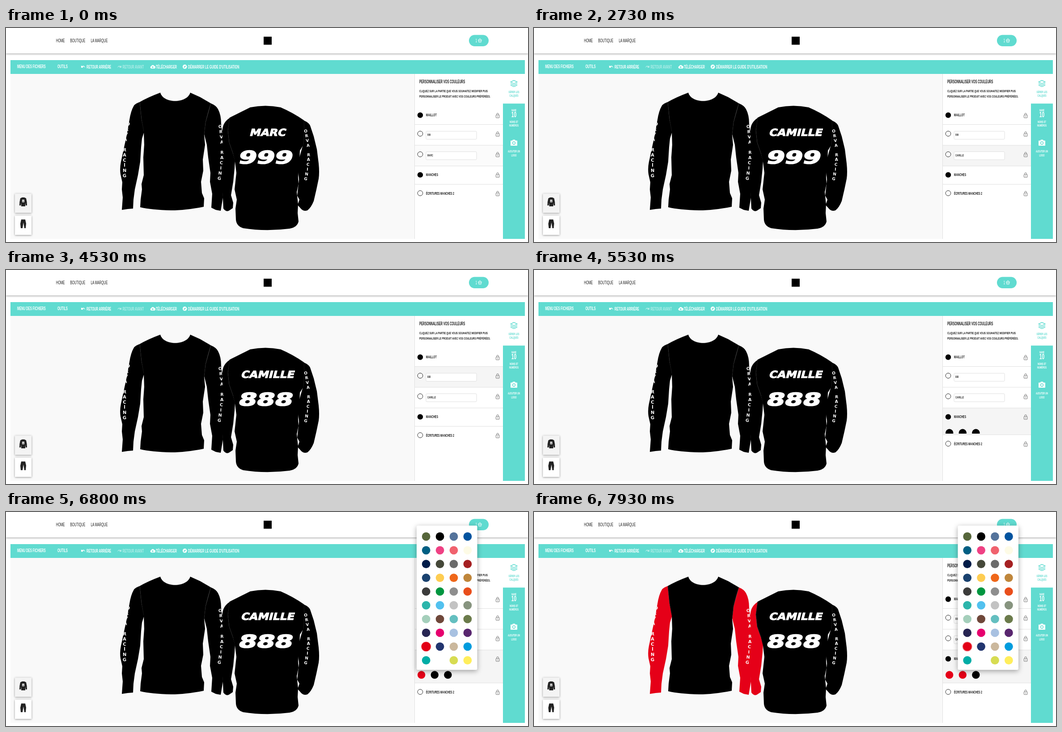
Write an HTML page that moves like this. It is 1167 by 480 pixels and loops after 8000 ms.

```html
<!DOCTYPE html>
<html lang="fr">
<head>
<meta charset="utf-8">
<title>Personnaliser vos couleurs</title>
<style>
  html, body { margin: 0; width: 100%; height: 100%; overflow: hidden; background: #fff; }
  svg { display: block; width: 100vw; height: 100vh; }
  text { font-family: "Liberation Sans", Arial, sans-serif; font-weight: 700; white-space: pre; }
  text.thin { font-weight: 400; }
  text.wide { font-family: "DejaVu Sans", sans-serif; fill: #fff; text-anchor: middle; }
  .mid { text-anchor: middle; }
  .line { stroke: #e0e0e0; }
  .shadow { filter: drop-shadow(0 1px 2px rgba(0, 0, 0, .4)); }
  .pop { filter: drop-shadow(0 3px 6px rgba(0, 0, 0, .35)); }
</style>
</head>
<body>
<svg id="stage" viewBox="0 0 1167 480" preserveAspectRatio="none" xmlns="http://www.w3.org/2000/svg"></svg>
<script>
const TEAL = '#60dbd0', RED = '#e50018', INK = '#1c1c1c';
const LOOP = 8000, NAME = 'CAMILLE', TEAM = 'ORVA RACING';
const COLORS = `56663b 000000 54739b 00539f 005f83 ef4184 f0626e fdfbe6
  001c48 454839 6b6b6b a52022 1a426f fecd52 ef671a bf863b
  3c3c3b 009640 8e8e8e e94e1b 2cb5ab 52c1ef c3c3c3 87947f
  a5cfbb 6f473a 64bfc0 6b7b4b 272552 e6006e a8c1e1 59266f
  e30016 22356f cbb89d 009cde 00ada6 ffffff d7dc52 ffee5c`.split(/\s+/).map(c => '#' + c);
const BLACK = 1, TURQUOISE = 36, SCARLET = 32;

// ---- drawing helpers ----
const label = (s, x, y, size, fill = INK, cls = '', id = '') =>
  `<text id="${id}" class="${cls}" transform="translate(${x} ${y}) scale(.6 1)" font-size="${size}" fill="${fill}">${s}</text>`;
const rect = (x, y, w, h, fill, more = '') =>
  `<rect x="${x}" y="${y}" width="${w}" height="${h}" fill="${fill}" ${more}/>`;
const dot = (x, y, r, fill, more = '') => `<circle cx="${x}" cy="${y}" r="${r}" fill="${fill}" ${more}/>`;
const path = (d, fill, more = '') => `<path d="${d}" fill="${fill}" ${more}/>`;
const hline = y => `<path class="line" d="M914 ${y}H1111"/>`;
const lock = y => `<g fill="none" stroke="#666" stroke-width=".9">
  <rect x="1095.4" y="${y - 1.5}" width="7.4" height="6.5" rx=".8"/>
  <path d="M1097 ${y - 1.5}v-1.8a2.1 2.1 0 0 1 4.2 0v1.8M1098 ${y + 1.8}h2.4"/></g>`;
const bullet = (y, full) => full ? dot(926, y, 6.2, '#000')
  : dot(926, y, 5.8, '#fff', 'stroke="#111" stroke-width=".9"');
const field = (y, id) => rect(939, y, 113, 18, '#fff', 'rx="2" stroke="#e0e0e0"')
  + rect(942, y + 2.5, 0, 13, '#b5d5fe', `id="${id}Sel"`)
  + label('', 942, y + 10.5, 7.2, '#333', '', id)
  + rect(942, y + 3.5, .9, 9.5, '#111', `id="${id}Caret"`);

// Letters stacked down a sleeve; place(i) gives [x, y, angle].
const stack = (clip, size, place) => `<g clip-path="url(#${clip})">` + [...TEAM].map((c, i) => {
  const [x, y, a] = place(i);
  return `<text class="wide" font-size="${size}" transform="translate(${x} ${y}) rotate(${a})" y="${size * .36}">${c}</text>`;
}).join('') + '</g>';

const SHAPES = {
  armL: 'M299 166Q290 169 286 174Q279 186 276 206L270 240 263 272 257 300Q254 315 256 328L260 346 259 362 261 380 259 408 272 406 284 405 285 385 288 362 295 330 300 300 302 268 304 248 309 232 303 205Z',
  armM: 'M458 169Q470 174 474 182Q481 195 481 215L484 245 485 275 488 300 489 325 484 352 485 380 480 410 469 408 459 403 461 372 456 345 457 325 452 290 449 262 443 238 446 212Z',
  armB: 'M501 201Q490 208 486 218Q481 234 482 260L484 300 487 330 483 352 485 385 486 405Q492 413 498 410L507 404 508 392 503 375 508 345 511 315 512 298 507 280 499 257 496 230Z',
  armR: 'M665 207Q677 212 680 219L688 243 695 272 699 304Q701 324 699 338L694 362 688 388Q682 403 674 409Q666 412 660 406L652 397 656 385 651 376 655 340 653 320 656 290 664 262Z',
  front: 'M345 145C352 170 404 170 412 145L434 155 458 169Q452 188 446 212L443 240 445 262 440 295 441 320 436 345 438 370 443 382 442 401Q400 409 370 409Q325 408 300 402L301 385 304 362 303 350 308 330 307 290 309 262 308 232 303 205 299 166Q318 155 345 145Z',
  back: 'M500 201Q522 190 546 178Q580 171 614 178Q642 190 666 207L667 235 665 262 657 275 656 300 653 335 654 350 650 368 653 395 652 415 654 434Q651 447 634 450Q580 457 530 449Q515 444 514 430L513 405 516 385 511 362 515 325 512 300 507 280 499 257 496 230Z'
};
const cloth = (k, id = '') => path(SHAPES[k], '#000', `id="${id}"`);

const header = rect(0, 0, 1167, 57, '#fff', 'class="shadow"')
  + label('HOME', 112, 31.8, 10.8, INK, 'thin') + label('BOUTIQUE', 143.5, 31.8, 10.8, INK, 'thin')
  + label('LA MARQUE', 189.5, 31.8, 10.8, INK, 'thin')
  + rect(576, 19.5, 18, 18, '#000')
  + rect(1035, 15.5, 44, 25.5, TEAL, 'rx="12.7"') + label('1', 1049.5, 32, 11, '#fff', 'thin')
  + `<g fill="none" stroke="#fff" stroke-width=".9"><path d="M1055 27h9M1056 27l1 5h5l1-5M1057 27l1.5-3h2l1.500 3M1058.300 28.500v2M1060.700 28.500v2"/></g>`;

const toolbar = rect(10, 72, 1150, 31, TEAL)
  + label('MENU DES FICHIERS', 25, 90, 10.4, '#fff') + label('OUTILS', 115, 90, 10.4, '#fff')
  + label('RETOUR ARRIÈRE', 180, 91, 10.3, '#fff') + label('RETOUR AVANT', 260.5, 91, 10.3, '#fff" opacity=".5')
  + label('TÉLÉCHARGER', 335, 91, 10.3, '#fff') + label("DÉMARRER LE GUIDE D'UTILISATION", 407, 91, 10.5, '#fff')
  + path('M168 84v5h5l-2-2q4-2 6 3q-1-7-7.300-4.500Z', '#fff')
  + path('M258 84v5h-5l2-2q-4-2-6 3q1-7 7.300-4.500Z', '#fff', 'opacity=".5"')
  + path('M325 91a2.800 2.800 0 0 1-.3-5.500a3.600 3.600 0 0 1 6.700-.4a2.900 2.900 0 0 1-.4 5.900Z', '#fff')
  + path('M328 90l-2.200-2.300h1.400v-2h1.600v2h1.400Z', TEAL)
  + dot(399.7, 86.8, 4.8, '#fff') + path('M402.300 84.300l-1.600 3.600-3.600 1.600 1.600-3.600Z', TEAL);

const thumbs = rect(20, 371.5, 37, 43, '#f4f4f4', 'class="shadow"') + rect(20, 421, 37, 43, '#fff', 'class="shadow"')
  + path('M36 380h5l4 2q2 7 2 16h-3l-1-6v8h-9v-8l-1 6h-3q0-9 2-16Z', '#222')
  + rect(36, 385, 5, 6, '#ddd') + path('M39 386l-1.500 4h1.500Z', '#222')
  + path('M34 429.500h9l2 9-1 10.500h-3l-2-13-2 13h-4l-1-10Z', '#222');

const jersey = `<g stroke-linejoin="round">${cloth('armL', 'armL')}
  <g id="armMid">${cloth('armM')}${cloth('armB')}</g>${cloth('armR')}${cloth('front')}${cloth('back')}
  <path d="M299 166L303 205 308 232M458 169Q452 188 446 212L443 240M500 201L496 230 499 257 507 280M666 207L667 235 665 262" fill="none" stroke="#2a2a2a" stroke-width=".6"/></g>`
  + stack('armLClip', 10, i => [265 + 8 * Math.max(0, 1 - i / 6) ** 2, 215 + 11.6 * i, 8 - i])
  + stack('armMClip', 9.5, i => [479 + 5 * Math.sin(Math.PI * i / 10) - .2 * i, 221 + 11.6 * i, i - 6])
  + stack('armRClip', 9, i => [670 + 6.5 * Math.sin(Math.PI * i / 10), 231 + 10.7 * i, 2 * i - 12])
  + `<text id="backName" class="wide" font-size="22" stroke="#fff" stroke-width="1.2" transform="translate(584 241.500) skewX(-14) scale(1.12 1)"></text>
  <text id="backNum" class="wide" font-size="39.500" stroke="#fff" stroke-width="2" transform="translate(578 304) skewX(-14) scale(1.47 1)"></text>`;

const panel = rect(914, 103, 197, 370, '#fff') + '<path class="line" d="M913.500 103V473"/>'
  + label('PERSONNALISER VOS COULEURS', 924, 124, 10.1)
  + label('CLIQUEZ SUR LA PARTIE QUE VOUS SOUHAITEZ MODIFIER PUIS', 924, 144, 8.1)
  + label('PERSONNALISER LE PRODUIT AVEC VOS COULEURS PRÉFÉRÉES.', 924, 156, 8.1)
  + rect(914, 217, 197, 46, '#f5f5f5', 'id="hoverNum"') + rect(914, 263, 197, 46, '#f5f5f5', 'id="hoverName"')
  + rect(914, 309, 197, 41, '#f5f5f5', 'id="hoverArm"')
  + bullet(195.5, true) + label('MAILLOT', 939, 198.3, 8.9) + lock(196.5)
  + hline(216.5) + bullet(237) + field(231.5, 'num') + lock(238)
  + hline(263) + bullet(283.3) + field(277.5, 'name') + lock(284)
  + hline(309.5) + bullet(329.4, true) + label('MANCHES', 939, 332, 8.9) + lock(330)
  + '<g clip-path="url(#fold)">' + [0, 1, 2].map(i => dot(928.7 + 29.6 * i, 365.3, 8.7, '#000', `id="spot${i}"`)).join('') + '</g>'
  + `<g id="lastRow">${hline(350.5)}${bullet(370.5)}${label('ÉCRITURES MANCHES 2', 939, 373.5, 8.8)}${lock(371.5)}</g>`;

const sidebar = rect(1111, 169.5, 49, 303.5, TEAL)
  + `<g fill="none" stroke="${TEAL}" stroke-width="1.500" stroke-linejoin="round"><path d="M1135.500 117.500l7.500 3.700-7.500 3.700-7.500-3.700ZM1128 124.700l7.500 3.700 7.500-3.700M1128 128l7.500 3.700 7.500-3.700"/></g>`
  + [['GÉRER LES', 145.7, TEAL], ['CALQUES', 154, TEAL], ['NOMS ET', 212.6, '#fff'], ['NUMÉROS', 220.8, '#fff'],
     ['AJOUTER UN', 279, '#fff'], ['LOGO', 287.5, '#fff']].map(([s, y, c]) => label(s, 1135.5, y, 6.9, c, 'mid')).join('')
  + label('NAME', 1135.5, 186.8, 6.3, '#fff', 'mid') + label('10', 1135.5, 200, 17, '#fff', 'mid')
  + path('M1129 252.500h3l1.200-2h4.600l1.200 2h3q1 0 1 1v9.500q0 1-1 1h-13q-1 0-1-1v-9.500q0-1 1-1Z', '#fff')
  + dot(1135.5, 258, 3, 'none', `stroke="${TEAL}" stroke-width="1.300"`);

const swatchXY = i => [21.2 + 30.9 * (i % 4), 55 + 30.85 * Math.floor(i / 4)];
const palette = '<g id="palette">' + rect(0, 30.5, 135.5, 323.5, '#fff', 'rx="3" class="pop"')
  + dot(0, 0, 10.4, 'none', 'id="ring" stroke-width="1.500" opacity=".4"')
  + COLORS.map((c, i) => dot(...swatchXY(i), 9.4, c, `id="sw${i}"`)).join('') + '</g>';

const clip = id => `<clipPath id="${id}Clip"><path d="${SHAPES[id]}"/></clipPath>`;
document.getElementById('stage').innerHTML =
  `<defs>${['armL', 'armM', 'armR'].map(clip).join('')}<clipPath id="fold"><rect id="foldBox" x="914" y="350" width="197" height="0"/></clipPath></defs>`
  + header + toolbar + rect(10, 103, 903, 370, '#f9f9f9') + thumbs + jersey + panel + sidebar + palette;

// ---- timeline ----
const $ = id => document.getElementById(id);
const set = (id, attrs) => { for (const k in attrs) $(id).setAttribute(k, attrs[k]); };
const at = (steps, t) => steps.reduce((v, [time, val]) => t >= time ? val : v, steps[0][1]);
const ramp = (t, start, ms) => Math.min(1, Math.max(0, (t - start) / ms));
const pulse = (t, up, down, ms = 120) => ramp(t, up, ms) - ramp(t, down, ms);
const ease = p => p * p * (3 - 2 * p);
const typed = (before, word, times) =>
  [[0, before], ...times.map((time, i) => [time, word.slice(0, i + 1)])];

const nameField = typed('MARC', NAME, [1530, 1670, 1800, 1870, 2000, 2070, 2200]);
const nameBack = typed('MARC', NAME, [1600, 1730, 1870, 1930, 2070, 2130, 2270]);
const numField = typed('999', '888', [3730, 3870, 4000]);
const numBack = typed('999', '888', [3800, 3930, 4070]);
const nameMark = [[0, ''], [470, 'caret'], [1000, ''], [1130, 'sel'], [1530, 'caret'], [2730, '']];
const numMark = [[0, ''], [3000, 'caret'], [3470, 'sel'], [3730, 'caret'], [4530, ''], [5000, 'caret'], [5130, '']];
const chosen = [[0, BLACK], [6800, SCARLET], [7470, BLACK], [7800, SCARLET]];
const pointed = [[0, -1], [6400, TURQUOISE], [6530, -1], [6670, SCARLET], [6930, -1], [7670, SCARLET], [7870, -1]];

function showField(id, text, mark) {
  $(id).textContent = text;
  const w = $(id).getComputedTextLength() * .6;
  set(id + 'Sel', { width: mark === 'sel' ? w : 0 });
  set(id + 'Caret', { x: 942.3 + w, opacity: mark === 'caret' ? 1 : 0 });
}

function render(t) {
  showField('name', at(nameField, t), at(nameMark, t));
  showField('num', at(numField, t), at(numMark, t));
  $('backName').textContent = at(nameBack, t);
  $('backNum').textContent = at(numBack, t);

  const open = 33 * ease(ramp(t, 5200, 600));
  set('hoverName', { opacity: ramp(t, -300, 800) - ramp(t, 2800, 200) });
  set('hoverNum', { opacity: pulse(t, 2800, 5000, 200) });
  set('hoverArm', { opacity: ramp(t, 5000, 200), height: 41 + open });
  set('foldBox', { height: Math.max(0, open - 2) });
  set('lastRow', { transform: `translate(0 ${open})` });

  const leftRed = t >= 6800, midRed = t >= 7800;
  set('spot0', { r: 8.7 + 1.8 * pulse(t, 5810, 6400), fill: leftRed ? RED : '#000' });
  set('spot1', { r: 8.7 + 1.8 * pulse(t, 7200, 7670), fill: midRed ? RED : '#000' });
  set('armL', { fill: t >= 6870 ? RED : '#000' });
  for (const p of $('armMid').children) p.setAttribute('fill', t >= 7870 ? RED : '#000');

  const pick = at(chosen, t), over = at(pointed, t), [cx, cy] = swatchXY(pick);
  set('palette', { visibility: t >= 6070 ? 'visible' : 'hidden', transform: `translate(${t >= 7470 ? 947.5 : 918} 0)` });
  set('ring', { cx, cy, stroke: COLORS[pick] });
  for (const i of [BLACK, TURQUOISE, SCARLET])
    set('sw' + i, { r: i === over ? 10.4 : i === pick ? 9.8 : 9.4 });
}

const start = performance.now();
(function tick() {
  render((performance.now() - start) % LOOP);
  requestAnimationFrame(tick);
})();
</script>
</body>
</html>
```
